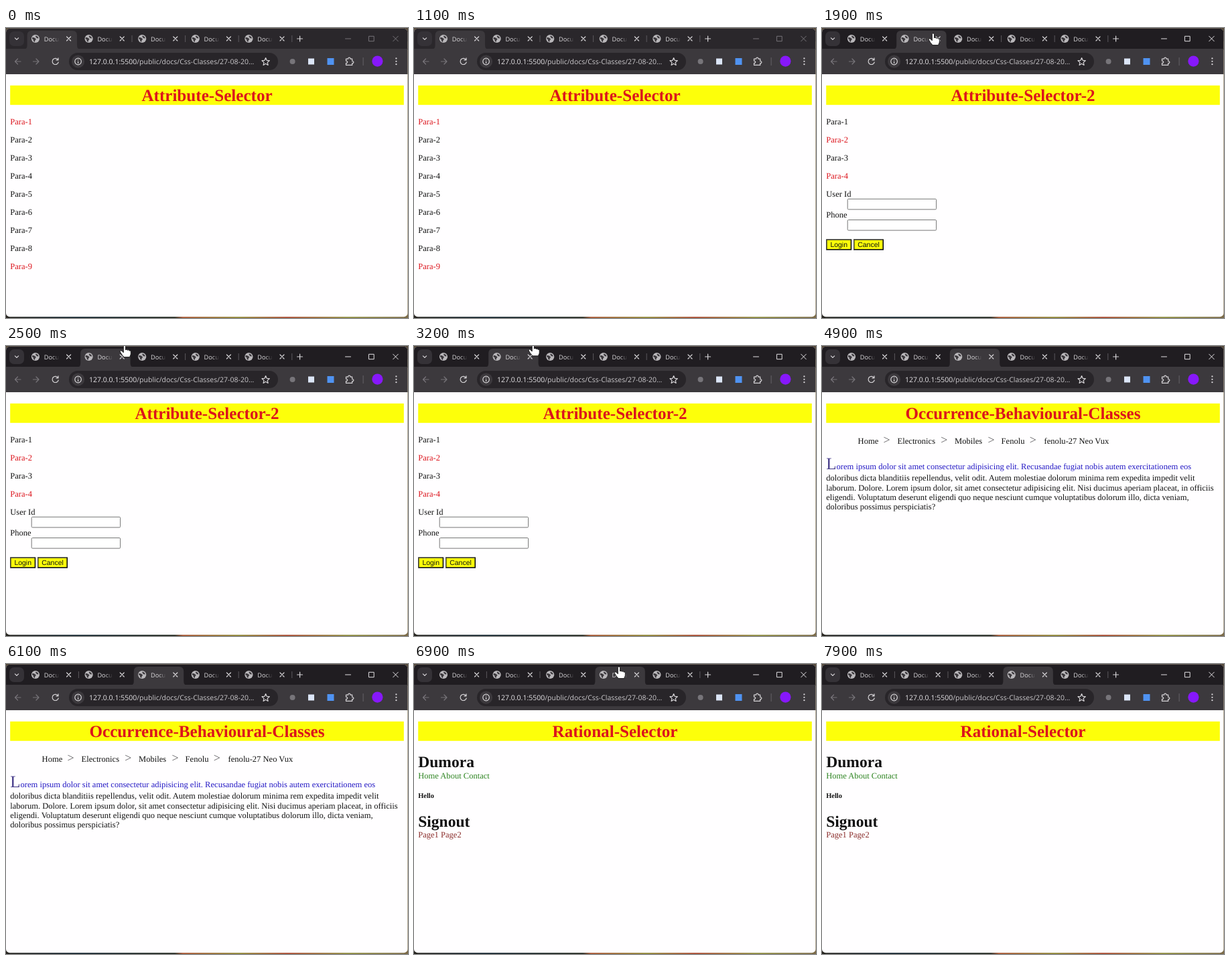
These frames come from a looping animation (600 px wide and 433 px high, 8 s). An HTML page:

```html
<!DOCTYPE html>
<html lang="en">
<head>
<meta charset="utf-8">
<title>CSS selector pages</title>
<style>
  html, body { margin: 0; width: 100%; height: 100%; overflow: hidden; background: #2a2620; }
  svg { display: block; width: 600px; height: 433px; }
  text { white-space: pre; text-rendering: geometricPrecision; }
  .ui { font-family: "Open Sans", "Noto Sans", sans-serif; }
  .page { font: 12.56px "Liberation Serif", "Times New Roman", serif; fill: #111; }
  .btn { font: 10.47px "Liberation Sans", Arial, sans-serif; }
  .line { fill: none; stroke: #d6d4d7; stroke-width: 1.2; stroke-linecap: round; stroke-linejoin: round; }
  .dim { stroke: #777479; }
</style>
</head>
<body>
<svg id="stage" viewBox="0 0 600 433"></svg>
<script>
const LOOP = 8000, STEP = 100;
const ACTIVATE = 1800;
const SWITCHES = [0, 1800, 4300, 6800];
const TAB_PITCH = 79.6;
const RED = '#dc141c';

// Pointer fingertip: time, x, y
const POINTER = [
  [1400, 152, -24], [1700, 160, 8], [1900, 166, 8], [2200, 174, 2], [2500, 177, -1],
  [3300, 178, -3], [3700, 214, -4], [4000, 227, -5], [4200, 230, 4], [4400, 232, 4],
  [4500, 234, -24], [6400, 290, -24], [6600, 302, 3], [6900, 306, 4], [7200, 312, -24]
];

const text = (x, y, s, attrs = '') => `<text x="${x}" y="${y}" ${attrs}>${s}</text>`;
const rect = (x, y, w, h, fill, attrs = '') =>
  `<rect x="${x}" y="${y}" width="${w}" height="${h}" fill="${fill}" ${attrs}/>`;
const circle = (x, y, r, fill) => `<circle cx="${x}" cy="${y}" r="${r}" fill="${fill}"/>`;
const line = (d, cls = '', attrs = '') => `<path class="line ${cls}" d="${d}" ${attrs}/>`;

function heading(title) {
  return rect(6.2, 85.8, 587.6, 29, '#fdff0a') +
    text(300, 109, title, `text-anchor="middle" font-size="25.12" font-weight="700" fill="${RED}"`);
}

function paras(count, reds) {
  let out = '';
  for (let i = 1; i <= count; i++) {
    out += text(6.2, 116.5 + 27.05 * i, 'Para-' + i, reds.includes(i) ? `fill="${RED}"` : '');
  }
  return out;
}

const field = y => rect(38.2, y, 132.4, 15.6, '#fff', 'rx="1.4" stroke="#767676"');

function button(x, w, label) {
  const y = 315.4, h = 16.2;
  return rect(x, y, w, h, '#000') +
    `<path d="M${x} ${y + h}V${y}h${w}l-1.5 1.5H${x + 1.5}V${y + h - 1.5}z" fill="#4c4c3c"/>` +
    rect(x + 1.5, y + 1.5, w - 3, h - 3, '#fdff0a') +
    text(x + w / 2, 327.2, label, 'class="btn" text-anchor="middle"');
}

function crumbs() {
  const items = [[53.6, 'Home'], [112.6, 'Electronics'], [198, 'Mobiles'], [267.6, 'Fenolu'], [331.6, 'fenolu-27 Neo Vux']];
  return items.map(([x, s]) => text(x, 146.2, s)).join('') +
    [91.5, 177.3, 247.5, 309.8].map(x => text(x, 146, '&gt;', 'font-size="18" fill="#626064"')).join('');
}

function lorem() {
  const rows = [
    'doloribus dicta blanditiis repellendus, velit odit. Autem molestiae dolorum minima rem expedita impedit velit',
    'laborum. Dolore. Lorem ipsum dolor, sit amet consectetur adipisicing elit. Nisi ducimus aperiam placeat, in officiis',
    'eligendi. Voluptatum deserunt eligendi quo neque nesciunt cumque voluptatibus dolorum illo, dicta veniam,',
    'doloribus possimus perspiciatis?'
  ];
  return text(6.2, 184.2, 'L', 'font-size="25.12" fill="#483d8b"') +
    text(21.5, 184.2, 'orem ipsum dolor sit amet consectetur adipisicing elit. Recusandae fugiat nobis autem exercitationem eos', 'fill="#2318c4"') +
    rows.map((s, i) => text(6.2, 201.2 + 14.4 * i, s)).join('');
}

const big = (y, s) => text(6.2, y, s, 'font-size="23.55" font-weight="700"');

const pages = [
  heading('Attribute-Selector') + paras(9, [1, 9]),
  heading('Attribute-Selector-2') + paras(4, [2, 4]) +
    text(6.2, 251.8, 'User Id') + field(255.3) +
    text(6.2, 283, 'Phone') + field(286.5) +
    button(6.2, 38, 'Login') + button(47, 45, 'Cancel'),
  heading('Occurrence-Behavioural-Classes') + crumbs() + lorem(),
  heading('Rational-Selector') + big(154, 'Dumora') +
    text(6.2, 171, 'Home About Contact', 'fill="#2d8420"') +
    text(6.2, 200, 'Hello', 'font-size="10.45" font-weight="700"') +
    big(243, 'Signout') + text(6.2, 259.4, 'Page1 Page2', 'fill="#8a2c2a"')
];

const tabPath = x =>
  `M${x - 6} 32q6 0 6-6V11q0-7 7-7h60.4q7 0 7 7V26q0 6 6 6z`;

function tab(i) {
  const x = 31.6 + i * TAB_PITCH;
  return `<path id="active${i}" d="${tabPath(x)}" fill="#3c393d"/>` +
    rect(x, 5, 74.4, 23, '#343136', `id="hover${i}" rx="7"`) +
    circle(x + 12.4, 16, 6.1, '#b9b7ba') +
    `<path transform="translate(${x + 12.4} 16)" fill="#3a373b" d="M-4.6-2.2L-1-1.2 1 .8-.6 2.4-1 5-3 3.4-3.2 1.2-5 .2zM.2-4.8L3.6-3 4.6-.4 2.2-.8 .4-2.4z"/>` +
    text(x + 25.2, 19.5, 'Docu', 'class="ui" font-size="9.2" fill="url(#fade' + i + ')"') +
    `<linearGradient id="fade${i}" gradientUnits="userSpaceOnUse" x1="${x + 37}" x2="${x + 48}">
      <stop stop-color="#dddbde"/><stop offset="1" stop-color="#dddbde" stop-opacity="0"/></linearGradient>` +
    line(`M${x + 59} 13l6 6m0-6l-6 6`) +
    rect(x + 76.3, 11, 1, 10, '#5b585d', `id="sep${i}"`);
}

const toolbar =
  rect(0, 31, 600, 38, '#3c393d') +
  line('M22 50H13.5m4-4l-4 4 4 4M40.5 50H49m-4-4l4 4-4 4', 'dim') +
  line('M77.6 47.4A4.6 4.6 0 1 0 78.2 51M78 44.8v3h-3') +
  rect(94, 37, 312, 26, '#282529', 'rx="13"') +
  circle(107.6, 50, 9.6, '#3c393d') +
  `<circle class="line" cx="107.6" cy="50" r="4.8"/>` +
  line('M107.6 50v2.4M107.6 47.6v.1') +
  text(124, 53.8, '127.0.0.1:5500<tspan fill="#cbc9cc">/public/docs/Css-Classes/27-08-20...</tspan>',
    'class="ui" font-size="10.5" fill="#e6e4e7"') +
  line('M387.6 44.6l1.6 3.7 4 .4-3 2.7.9 4-3.5-2.1-3.5 2.1.9-4-3-2.7 4-.4z') +
  circle(427.6, 50, 4, '#77757a') +
  rect(451, 45.5, 9, 9, '#dce6f8') +
  rect(479.5, 45, 10, 10, '#4f93f2') +
  line('M507.5 46.2h3.2c-.6-2.8 3.8-2.8 3.2 0h2.8v3.4c2.8-.6 2.8 3.6 0 3v2.8h-9.2v-3c2.8.2 2.8-3.4 0-3.2z') +
  rect(532.6, 44, 1, 12, '#646167') +
  circle(554.4, 49.6, 8.1, '#8718fb') +
  [45.4, 49.8, 54.2].map(y => circle(582.4, y, 1.15, '#d6d4d7')).join('');

const controls = 'M506.5 16h8M541.8 12.3h7.4v7.4h-7.4zM577.7 12.2l7.6 7.6m0-7.6l-7.6 7.6';

document.getElementById('stage').innerHTML = `
  <defs>
    <clipPath id="win"><rect y=".8" width="599.4" height="430.4" rx="5.5"/></clipPath>
    <linearGradient id="desk">
      <stop stop-color="#26241f"/><stop offset=".18" stop-color="#10222c"/>
      <stop offset=".42" stop-color="#20261c"/><stop offset=".44" stop-color="#a5502c"/>
      <stop offset=".58" stop-color="#8c8430"/><stop offset=".7" stop-color="#a8462c"/>
      <stop offset=".85" stop-color="#8b8a3a"/><stop offset="1" stop-color="#7b6a48"/>
    </linearGradient>
  </defs>
  ${rect(0, 0, 600, 433, 'url(#desk)')}
  ${rect(0, 0, 600, 20, '#564a3b')}
  <g clip-path="url(#win)">
    ${rect(0, 0, 600, 433, '#fffeff')}
    ${rect(0, 0, 600, 32, '#201d21', 'id="strip"')}
    ${rect(5, 5, 22, 22, '#353237', 'rx="7"')}
    ${line('M13.4 14.8l2.6 2.6 2.6-2.6', '', 'stroke-width="1.5"')}
    ${[0, 1, 2, 3, 4].map(tab).join('')}
    ${line('M434.6 16h8m-4-4v8')}
    <path id="controls" class="line" d="${controls}" style="stroke-width:1"/>
    ${toolbar}
    ${pages.map((p, i) => `<g class="page" id="page${i}">${p}</g>`).join('')}
  </g>
  <path id="pointer" fill="#fff" stroke="#111" stroke-width=".9" stroke-linejoin="round"
    d="M-1.7 1.6C-1.7-.5 1.5-.5 1.5 1.6V7c.5-1.3 2.8-1.1 2.9.4.7-1 2.6-.7 2.7.8.8-.7 2.2-.2 2.2 1.2v3.4c0 2-1.5 2.6-1.5 4.8H-1.5c0-1.8-1.7-2.5-2.8-4.2L-6.6 9.8C-7.4 8-5.2 7-4 8.4l2.3 2.4z"/>`;

const el = id => document.getElementById(id);
const show = (id, on) => { el(id).style.display = on ? '' : 'none'; };

function pointerAt(t) {
  const last = POINTER.length - 1;
  if (t <= POINTER[0][0] || t >= POINTER[last][0]) return [0, -40];
  const i = POINTER.findIndex(p => p[0] > t);
  const [t0, x0, y0] = POINTER[i - 1], [t1, x1, y1] = POINTER[i];
  const k = (t - t0) / (t1 - t0);
  return [x0 + (x1 - x0) * k, y0 + (y1 - y0) * k];
}

function draw(now) {
  const t = Math.floor((now % LOOP) / STEP) * STEP;
  const current = SWITCHES.filter(s => s <= t).length - 1;
  const focused = t >= ACTIVATE;
  const [px, py] = pointerAt(t);
  const hovered = py > -12 ? Math.floor((px - 29) / TAB_PITCH) : -1;

  for (let i = 0; i < 5; i++) {
    show('active' + i, i === current);
    show('hover' + i, i === hovered && i !== current);
    show('sep' + i, ![i, i + 1].some(n => n === current || n === hovered));
    if (i < pages.length) show('page' + i, i === current);
  }
  el('strip').setAttribute('fill', focused ? '#201d21' : '#2a272b');
  el('controls').style.stroke = focused ? '#e2e0e3' : '#767378';
  el('pointer').setAttribute('transform', `translate(${px} ${py})`);
}

const start = performance.now();
function tick() {
  draw(performance.now() - start);
  requestAnimationFrame(tick);
}
tick();
</script>
</body>
</html>
```
